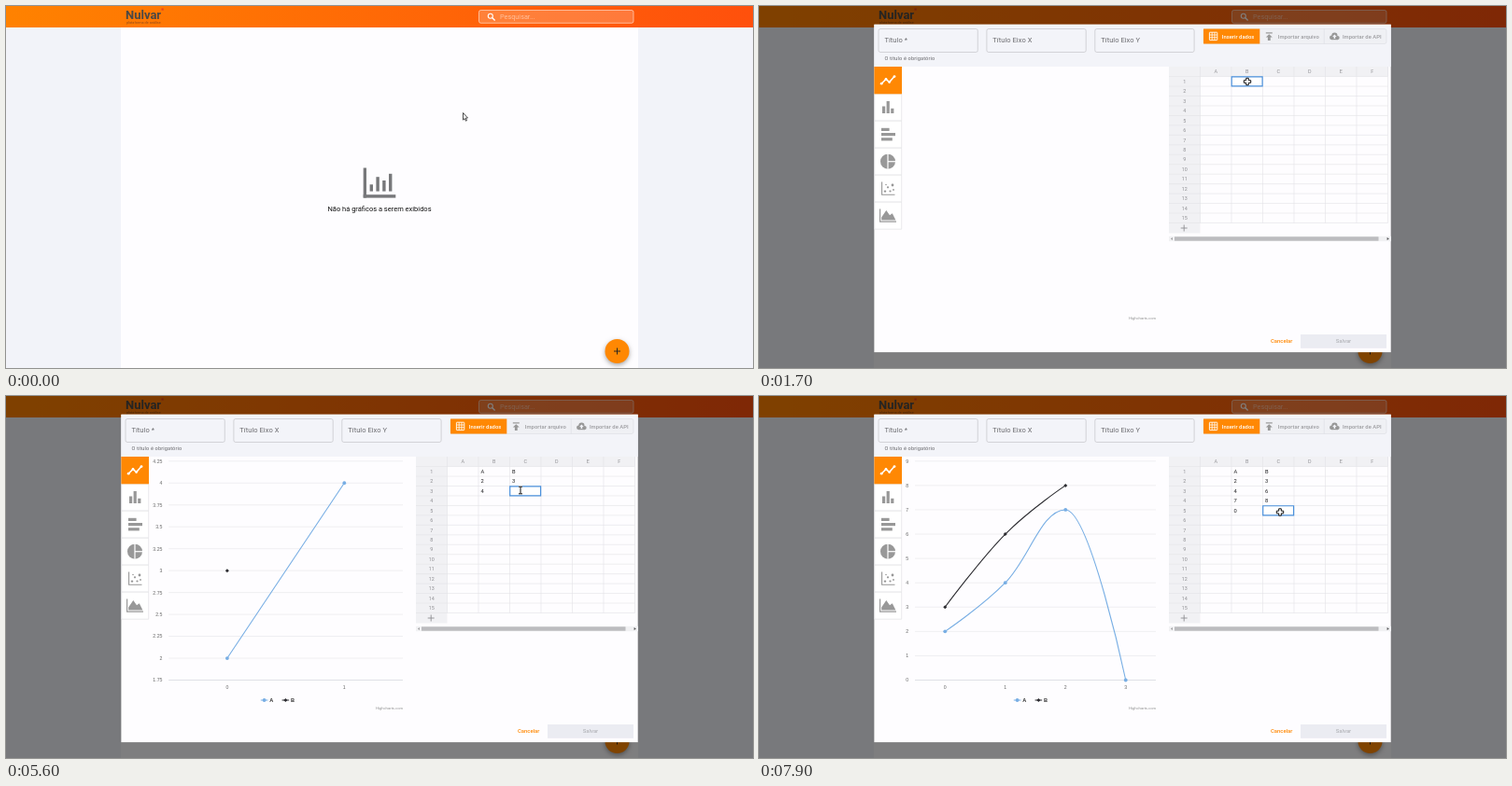
Animation, 800 px wide and 388 px high, one loop 8000 ms. Source, as an HTML page with a canvas:

```html
<!DOCTYPE html>
<html lang="pt">
<head>
<meta charset="utf-8">
<title>Editor de gráficos</title>
<style>
html, body { margin: 0; width: 100%; height: 100%; overflow: hidden; background: #f2f3f9; }
canvas { display: block; width: 800px; height: 388px; }
</style>
</head>
<body>
<canvas id="stage"></canvas>
<script>
const LOOP = 8000, STEP = 100;
const ORANGE = '#ff8803', GREY = '#989898', BLUE = '#4a90dc';
const SANS = 'Roboto, sans-serif', ARIAL = '"Liberation Sans", Arial, sans-serif';
const canvas = document.getElementById('stage');
const c = canvas.getContext('2d');
const dpr = window.devicePixelRatio || 1;
canvas.width = 800 * dpr;
canvas.height = 388 * dpr;

// time, x, y, pointer kind
const POINTER = [
  [0, 489.5, 114.5, 'arrow'], [700, 650, 365, 'hand'], [900, 655, 368, 'hand'],
  [1100, 652, 360, 'arrow'], [1600, 523, 81, 'cross'], [1900, 523, 81, 'cross'],
  [2100, 530, 60, 'arrow'], [2500, 541, 33, 'arrow'], [3200, 541, 33, 'arrow'],
  [3500, 538.5, 24.5, 'arrow'], [3800, 530, 130, 'cross'], [4000, 521, 93, 'cross'],
  [4300, 521, 93, 'cross'], [4500, 556, 93, 'cross'], [4700, 556, 93, 'cross'],
  [4900, 521, 103, 'cross'], [5100, 521, 103, 'cross'], [5300, 551, 101, 'beam'],
  [5800, 551, 101, 'beam'], [5900, 521, 113, 'cross'], [6000, 521, 113, 'cross'],
  [6100, 549, 115, 'cross'], [6700, 547, 120, 'cross'], [6900, 523, 124, 'cross'],
  [7500, 523, 124, 'cross'], [7800, 558, 124.5, 'cross'], [8000, 558, 124.5, 'cross']
];

// time, column, row, typed text
const ENTRIES = [
  [1600, 1, 1], [1900, 1, 1, 'A'], [2400, 2, 1], [2700, 2, 1, 'B'],
  [4000, 1, 2], [4200, 1, 2, '2'], [4500, 2, 2], [4700, 2, 2, '3'],
  [4900, 1, 3], [5100, 1, 3, '4'], [5300, 2, 3], [5800, 2, 3, '6'],
  [5900, 1, 4], [6000, 1, 4, '7'], [6100, 2, 4], [6200, 2, 4, '8'],
  [6900, 1, 5], [7400, 1, 5, '0'], [7800, 2, 5]
];

const lerp = (a, b, p) => a + (b - a) * p;
const clamp = v => Math.max(0, Math.min(1, v));
const ease = p => (1 - Math.cos(Math.PI * p)) / 2;

function rect(x, y, w, h, fill) {
  c.fillStyle = fill;
  c.fillRect(x, y, w, h);
}

function box(x, y, w, h, r, fill, stroke, width = 0.7) {
  c.beginPath();
  c.roundRect(x, y, w, h, r);
  if (fill) { c.fillStyle = fill; c.fill(); }
  if (stroke) { c.strokeStyle = stroke; c.lineWidth = width; c.stroke(); }
}

function disc(x, y, r, fill) {
  c.beginPath();
  c.arc(x, y, r, 0, 7);
  c.fillStyle = fill;
  c.fill();
}

function path(pts, stroke, width, fill) {
  c.beginPath();
  pts.forEach(([x, y], i) => i ? c.lineTo(x, y) : c.moveTo(x, y));
  if (fill) { c.closePath(); c.fillStyle = fill; c.fill(); }
  if (stroke) { c.strokeStyle = stroke; c.lineWidth = width; c.stroke(); }
}

function text(s, x, y, size, color, { weight = 400, align = 'left', font = SANS, gap = 0 } = {}) {
  c.font = `${weight} ${size}px ${font}`;
  c.letterSpacing = gap + 'px';
  c.textAlign = align;
  c.textBaseline = 'alphabetic';
  c.fillStyle = color;
  c.fillText(s, x, y);
}

function drawPage(t) {
  rect(0, 0, 800, 388, '#f2f3f9');
  rect(123, 23, 554, 365, '#fefdff');
  const g = c.createLinearGradient(0, 0, 800, 23);
  g.addColorStop(0, '#ff8200');
  g.addColorStop(1, '#ff500c');
  rect(0, 0, 800, 23, g);

  text('Nulvar', 128, 14.3, 13, '#4b4845', { weight: 700 });
  text('plataforma de análise', 129, 19, 3.8, '#8a4a1c');
  rect(166.5, 2.5, 2.2, 2.2, '#e8421c');

  box(506.5, 4.5, 165.5, 13.8, 2, 'rgba(255,255,255,.2)', 'rgba(255,255,255,.75)');
  c.beginPath();
  c.arc(518.8, 10.7, 2.5, 0, 7);
  c.strokeStyle = '#fff';
  c.lineWidth = 1.1;
  c.stroke();
  path([[520.6, 12.5], [523.6, 15.4]], '#fff', 1.4);
  text('Pesquisar...', 529, 14.4, 7.3, 'rgba(255,255,255,.5)');

  const bars = '#77787a';
  rect(382.7, 173.5, 3.3, 32, bars);
  rect(382.7, 202.2, 34.6, 3.4, bars);
  [[389.6, 191.3], [396.4, 183.2], [403.2, 187], [410, 179.8]]
    .forEach(([x, y]) => rect(x, y, 3.4, 198.6 - y, bars));
  text('Não há gráficos a serem exibidos', 400, 220.2, 7.5, '#111', { align: 'center' });

  c.save();
  c.shadowColor = 'rgba(0,0,0,.35)';
  c.shadowBlur = 5 * dpr;
  c.shadowOffsetY = 2 * dpr;
  disc(654.5, 370, 13, ORANGE);
  c.restore();
  if (t >= 800 && t < 1200) disc(654.5, 370, 13, `rgba(0,0,0,${t < 900 ? 0.12 : 0.3})`);
  path([[651, 370], [658, 370]], '#2b2622', 1);
  path([[654.5, 366.5], [654.5, 373.5]], '#2b2622', 1);
}

function drawForm() {
  rect(123.4, 19.8, 553.3, 45.2, '#f3f4f9');
  ['Título *', 'Título Eixo X', 'Título Eixo Y'].forEach((label, i) => {
    const x = 128 + i * 115.9;
    box(x, 24.5, 106.3, 25, 2, null, '#c4c5c9');
    text(label, x + 6.4, 39.1, 7.5, '#6b6b6f', { gap: 0.05 });
  });
  text('O título é obrigatório', 134.4, 58, 5.62, '#68686c', { gap: 0.13 });

  box(476, 24.5, 196, 16, 2, '#eff0f4', '#dcdde2', 0.6);
  rect(476, 24.5, 60.3, 16, ORANGE);
  path([[605.3, 24.5], [605.3, 40.5]], '#dcdde2', 0.6);
  const bold = { weight: 500, gap: 0.03 };
  text('Inserir dados', 495.7, 34.6, 5.85, '#fff', bold);
  text('Importar arquivo', 555.8, 34.6, 5.85, '#9b9b9f', bold);
  text('Importar de API', 624.9, 34.6, 5.85, '#9b9b9f', bold);

  box(482.4, 28.2, 8.4, 8.4, 0.5, null, '#fff', 0.9);
  [2.8, 5.6].forEach(d => {
    path([[482.4 + d, 28.2], [482.4 + d, 36.6]], '#fff', 0.8);
    path([[482.4, 28.2 + d], [490.8, 28.2 + d]], '#fff', 0.8);
  });
  rect(542.8, 28.3, 7, 1.2, GREY);
  path([[546.3, 30.2], [549.8, 33.5], [547.7, 33.5], [547.7, 37], [544.9, 37], [544.9, 33.5], [542.8, 33.5]], null, 0, GREY);
  disc(613.4, 33.8, 2.4, GREY);
  disc(616.4, 31.7, 3.1, GREY);
  disc(619.6, 34.1, 2.1, GREY);
  rect(613.4, 33, 6.2, 3.2, GREY);
  path([[616.4, 30.6], [618.7, 33.1], [617.2, 33.1], [617.2, 34.9], [615.6, 34.9], [615.6, 33.1], [614.1, 33.1]], null, 0, '#f3f4f9');

  text('Cancelar', 548, 361.3, 5.9, ORANGE, { weight: 500 });
  rect(580, 352, 92, 14.8, '#ebecf2');
  text('Salvar', 626, 361.3, 5.9, '#b4b5ba', { weight: 500, align: 'center' });
}

function drawTypes() {
  for (let i = 1; i < 6; i++) box(123.7, 65.2 + i * 29, 29, 29, 0, '#fff', '#dcdce0', 0.6);
  rect(123.4, 65, 29.6, 29.3, ORANGE);
  const line = [[131.2, 83.2], [136, 78.4], [139.6, 81.6], [145, 75.6]];
  path(line, '#fff', 1.5);
  line.forEach(([x, y]) => disc(x, y, 1.4, '#fff'));

  [[132, 107.5], [136.6, 102], [141.2, 109.8]].forEach(([x, y]) => rect(x, y, 3.2, 115 - y, GREY));
  [[130.8, 8.6], [136, 15], [141.2, 11.8]].forEach(([y, w]) => rect(131, y, w, 3.2, GREY));

  disc(138, 166.7, 8, GREY);
  path([[138, 158], [138, 175.5]], '#fff', 1.2);
  path([[138, 166.7], [146.5, 166.7]], '#fff', 1.2);

  path([[131.6, 188.5], [131.6, 202.3], [145.5, 202.3]], GREY, 1.1);
  [[135, 198.6, 1.2], [138, 194.3, 1.1], [140.5, 198.5, 1.1], [143, 192, 1.4], [144, 197, 0.9], [136, 191.5, 0.8]]
    .forEach(([x, y, r]) => disc(x, y, r, GREY));

  path([[129.6, 217.5], [129.6, 231.2], [147, 231.2]], GREY, 1.2);
  path([[131.2, 229.6], [131.2, 226.5], [136.3, 219], [140, 224.3], [142.8, 222.3], [146.4, 229.6]], null, 0, GREY);
}

const COL = 33.5, ROW = 10.46;
const cellX = col => 472.5 + col * COL;
const cellY = row => 75.6 + (row - 1) * ROW;

function drawSheet(t) {
  const head = '#f1f1f4', rule = '#e2e2e6';
  rect(439, 65, 235, 10.6, head);
  rect(439, 65, 33.5, 178.5, head);
  for (let i = 0; i <= 6; i++) path([[cellX(i), 65], [cellX(i), 232.5]], rule, 0.6);
  for (let r = 1; r <= 16; r++) path([[439, cellY(r)], [673.5, cellY(r)]], rule, 0.6);
  const mid = { align: 'center' };
  [...'ABCDEF'].forEach((s, i) => text(s, cellX(i) + COL / 2, 72.4, 5.4, '#929296', mid));
  for (let r = 1; r <= 15; r++) text(r, 455.7, cellY(r) + 7.2, 5.4, '#8e8e92', mid);
  path([[451.7, 238], [458.7, 238]], '#8e8e92', 0.9);
  path([[455.2, 234.5], [455.2, 241.5]], '#8e8e92', 0.9);

  rect(439, 246.8, 238, 5.4, '#f1f1f3');
  rect(445, 247.3, 218.5, 4.4, '#bcbcbf');
  path([[443, 247.9], [443, 251.1], [440.8, 249.5]], null, 0, '#a5a5a8');
  path([[672.6, 247.9], [672.6, 251.1], [674.8, 249.5]], null, 0, '#505053');

  const done = ENTRIES.filter(e => e[0] <= t);
  const last = done[done.length - 1];
  if (last) {
    const x = cellX(last[1]), y = cellY(last[2]);
    box(x + 0.2, y + 0.3, COL - 0.6, ROW - 0.4, 0, '#fff', BLUE, 1.2);
  }
  done.forEach(([, col, row, s]) => {
    if (s) text(s, cellX(col) + 2.5, cellY(row) + 7.1, 5.8, '#1c1c1e');
  });
  if (last && last[3]) rect(cellX(last[1]) + 6.4, cellY(last[2]) + 2, 0.6, 6.4, '#222');
}

const RIGHT = 425, TOP = 69.8, BASE = 304.5;

function scaleFor(data) {
  const all = data.flat(), min = Math.min(...all), max = Math.max(...all);
  const n = Math.max(data[0].length, data[1].length);
  if (min === max) return { lo: min - 0.5, hi: max + 0.5, ticks: [min], left: 167, n };
  const pad = (max - min) * 0.05, raw = (max - min) * 1.1 * 0.12;
  const mag = 10 ** Math.floor(Math.log10(raw));
  const m = [1, 2, 2.5, 5, 10];
  const step = mag * m.find((v, i) => i === 4 || raw / mag <= (v + m[i + 1]) / 2);
  const from = Math.floor(Math.max(0, min - pad) / step), to = Math.ceil((max + pad) / step);
  const ticks = [];
  for (let k = from; k <= to; k++) ticks.push(+(k * step).toFixed(2));
  const chars = Math.max(...ticks.map(v => String(v).length));
  return { lo: from * step, hi: to * step, ticks, left: 167 + [0, 0, 0, 4.4, 7.2][chars], n };
}

const STAGES = [];
{
  let data = [[], []];
  ENTRIES.filter(e => e[3] && e[2] > 1).forEach(([time, col, , s]) => {
    data = data.map((d, i) => i === col - 1 ? [...d, +s] : d);
    STAGES.push({ start: time + 100, data, scale: scaleFor(data) });
  });
}

// Smooth curve whose control points never overshoot a neighbour
function spline(pts) {
  const ctrl = pts.map(([x, y], i) => {
    const a = pts[i - 1], b = pts[i + 1];
    if (!a || !b) return { l: [x, y], r: [x, y] };
    const lx = (1.5 * x + a[0]) / 2.5, rx = (1.5 * x + b[0]) / 2.5;
    let ly = (1.5 * y + a[1]) / 2.5, ry = (1.5 * y + b[1]) / 2.5;
    const fix = rx === lx ? 0 : (ry - ly) * (rx - x) / (rx - lx) + y - ry;
    ly += fix;
    ry += fix;
    const held = (v, q) => Math.max(Math.min(q, y), Math.min(Math.max(q, y), v));
    if (held(ly, a[1]) !== ly) { ly = held(ly, a[1]); ry = 2 * y - ly; }
    if (held(ry, b[1]) !== ry) { ry = held(ry, b[1]); ly = 2 * y - ry; }
    return { l: [lx, ly], r: [rx, ry] };
  });
  c.beginPath();
  pts.forEach((p, i) => i ? c.bezierCurveTo(...ctrl[i - 1].r, ...ctrl[i].l, ...p) : c.moveTo(...p));
}

function marker(kind, x, y, color) {
  if (kind) path([[x, y - 2], [x + 2, y], [x, y + 2], [x - 2, y]], null, 0, color);
  else disc(x, y, 1.9, color);
}

function drawChart(t) {
  text('Highcharts.com', RIGHT, 336.2, 4.2, '#909090', { align: 'right', font: ARIAL });
  const k = STAGES.findLastIndex(s => s.start <= t);
  if (k < 0) return;
  const cur = STAGES[k], old = STAGES[k - 1] || cur, next = STAGES[k + 1];
  const span = Math.min(400, next ? next.start - cur.start : 400);
  const p = ease(clamp((t - cur.start) / span));
  const mix = key => lerp(old.scale[key], cur.scale[key], p);
  const lo = mix('lo'), hi = mix('hi'), left = mix('left'), n = mix('n');
  const px = i => left + (i + 0.5) / n * (RIGHT - left);
  const py = v => BASE - (v - lo) / (hi - lo) * (BASE - TOP);

  new Set([...old.scale.ticks, ...cur.scale.ticks]).forEach(v => {
    const y = py(v);
    if (y < TOP - 1 || y > BASE + 1) return;
    const was = old.scale.ticks.includes(v), is = cur.scale.ticks.includes(v);
    c.globalAlpha = was && is ? 1 : is ? p : 1 - p;
    path([[left, y], [RIGHT, y]], '#e4e4e8', 0.6);
    text(v, left - 6.8, y + 1.9, 5.2, '#666', { align: 'right', font: ARIAL });
    c.globalAlpha = 1;
  });
  path([[left, BASE], [RIGHT, BASE]], '#d9dbe2', 0.7);
  for (let i = 0; i < cur.scale.n; i++) {
    c.globalAlpha = i < old.scale.n ? 1 : p;
    text(i, px(i), 313.6, 5.2, '#666', { align: 'center', font: ARIAL });
    c.globalAlpha = 1;
  }

  ['#78aee4', '#2c2c31'].forEach((color, s) => {
    const before = old.data[s], end = before.length - 1;
    const pts = cur.data[s].map((v, i) => i <= end || end < 0
      ? [px(i), py(v)]
      : [px(lerp(end, i, p)), py(lerp(before[end], v, p))]);
    if (pts.length > 1) {
      spline(pts);
      c.strokeStyle = color;
      c.lineWidth = 1.1;
      c.stroke();
    }
    pts.forEach(([x, y]) => marker(s, x, y, color));

    const x = 276.6 + s * 22.8;
    path([[x - 3.8, 326], [x + 3.8, 326]], color, 1);
    marker(s, x, 326, color);
    text('AB'[s], x + 5.6, 328, 5.6, '#333', { weight: 700, font: ARIAL });
  });
}

function drawDialog(t) {
  const p = clamp((t - 900) / 300);
  if (!p) return;
  rect(0, 0, 800, 388, `rgba(0,0,0,${0.5 * p})`);
  const z = lerp(0.7, 1, ease(p));
  c.save();
  c.globalAlpha = p;
  c.translate(400, 195);
  c.scale(z, z);
  c.translate(-400, -195);
  rect(123.4, 19.8, 553.3, 351.3, '#fefdff');
  drawForm();
  drawTypes();
  drawSheet(t);
  drawChart(t);
  c.restore();
}

const SHAPES = {
  arrow() {
    path([[0, 0], [0, 7.6], [1.7, 6.1], [2.9, 8.7], [4, 8.2], [2.9, 5.6], [5, 5.5], [0, 0]], '#222', 0.8, '#fff');
  },
  hand() {
    c.beginPath();
    c.roundRect(-0.8, 0, 1.7, 7, 0.8);
    c.roundRect(-2, 4, 6, 5.4, 1.5);
    c.strokeStyle = '#111';
    c.lineWidth = 1.4;
    c.stroke();
    c.fillStyle = '#fff';
    c.fill();
    path([[-1.6, 6.6], [-3.2, 5]], '#111', 1.2);
  },
  cross() {
    const a = 1.3, b = 3.7;
    path([[-a, -b], [a, -b], [a, -a], [b, -a], [b, a], [a, a], [a, b], [-a, b], [-a, a], [-b, a], [-b, -a], [-a, -a], [-a, -b]], '#111', 1, '#fff');
  },
  beam() {
    [['#fff', 2], ['#111', 1]].forEach(([color, w]) => {
      path([[0, -3.6], [0, 3.6]], color, w);
      path([[-2, -3.8], [2, -3.8]], color, w);
      path([[-2, 3.8], [2, 3.8]], color, w);
    });
  }
};

function drawPointer(t) {
  const i = POINTER.findLastIndex(k => k[0] <= t);
  const a = POINTER[i], b = POINTER[i + 1] || a;
  const p = a === b ? 0 : ease((t - a[0]) / (b[0] - a[0]));
  c.save();
  c.translate(lerp(a[1], b[1], p), lerp(a[2], b[2], p));
  SHAPES[a[3]]();
  c.restore();
}

function render(now) {
  const t = Math.floor((now % LOOP) / STEP) * STEP;
  c.setTransform(dpr, 0, 0, dpr, 0, 0);
  drawPage(t);
  drawDialog(t);
  drawPointer(t);
}

let begin;
function tick(now) {
  begin ??= now;
  render(now - begin);
  requestAnimationFrame(tick);
}
render(0);
requestAnimationFrame(tick);
</script>
</body>
</html>
```
